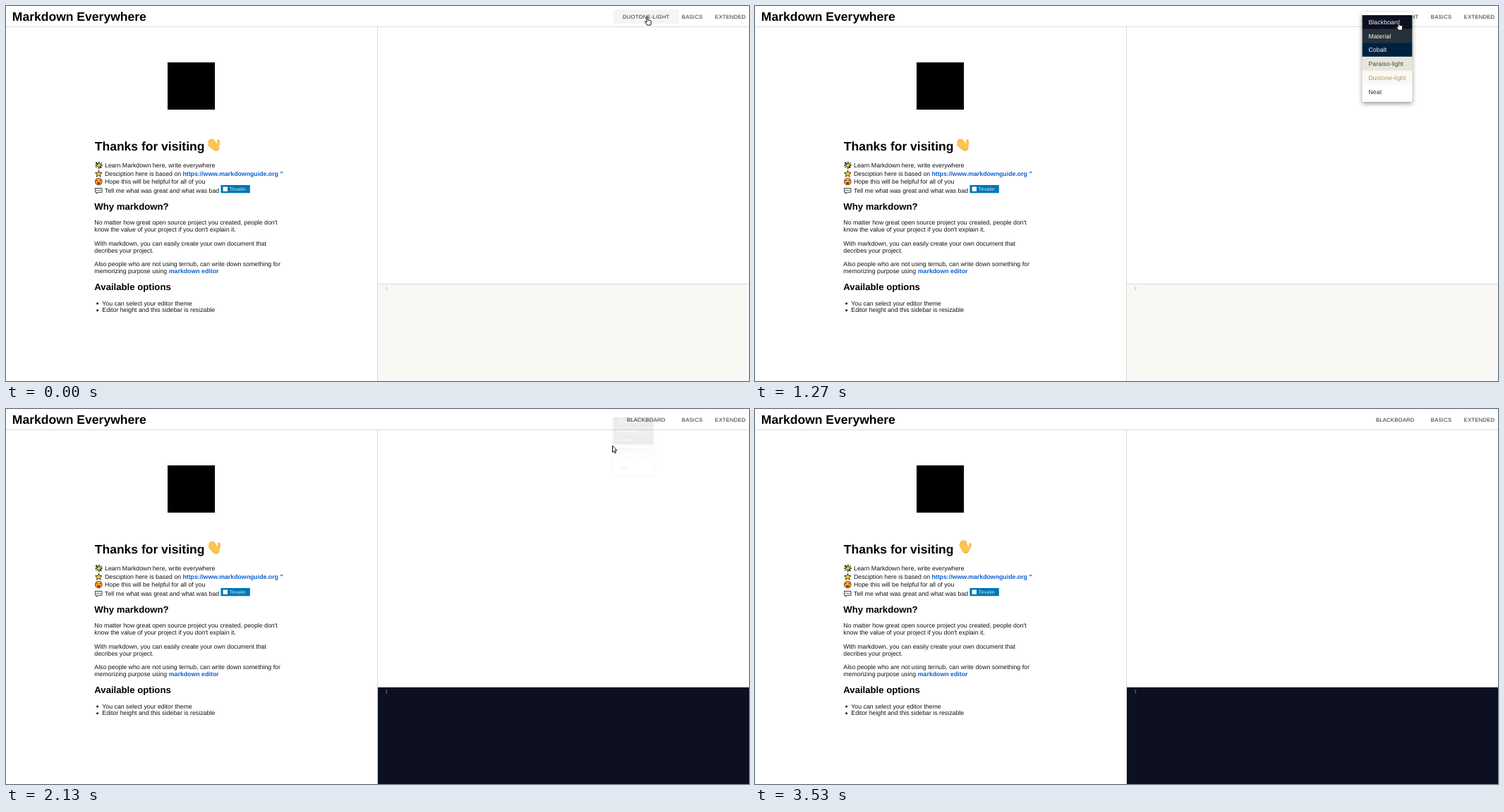
Animation of 1053x532 px, one loop 3.59 s. Source, as an HTML page with a canvas:

```html
<!DOCTYPE html>
<html lang="en">
<head>
<meta charset="utf-8">
<title>Markdown Everywhere</title>
<style>
html, body { margin: 0; width: 100%; height: 100%; overflow: hidden; background: #fff; }
canvas { display: block; }
</style>
</head>
<body>
<canvas id="stage" width="1053" height="532"></canvas>
<script>
const ctx = document.getElementById('stage').getContext('2d');
const LOOP = 3590, STEP = 1000 / 15;
const SANS = '"Liberation Sans", Arial, sans-serif';
const BODY = 8.776;
const INK = '#111', LINK = '#0a5fd0';
const MENU = { x: 860.6, y: 8.6, w: 70.8, h: 127.5, row: 19.75, pad: 4.4 };
const THEMES = [
  ['Blackboard', '#0c1021', '#f8f8f8'],
  ['Material', '#263238', '#ffffff'],
  ['Cobalt', '#002240', '#ffffff'],
  ['Paraiso-light', '#e7e6da', '#41423f'],
  ['Duotone-light', '#faf8f5', '#b29762'],
  ['Neat', '#ffffff', '#333333'],
];

// [ms, value...] keys
const WAVE = [
  [0, 0], [200, .5], [270, .5], [470, 0], [670, 0], [870, .5], [1070, .3], [1200, 0], [1270, 0],
  [1430, .5], [1600, 0], [1670, 0], [1867, 1], [1933, .75], [2200, 0], [2400, .7], [2600, .5],
  [2800, 0], [3000, 1], [3200, 0], [3330, 0], [3533, .8],
];
const POINTER = [
  [0, 908.7, 15.3], [1130, 908.7, 15.3], [1265, 912, 22.5], [2070, 912, 22.5], [2133, 860, 52],
  [2200, 759, 108], [2267, 600, 208], [2400, 335, 365], [2600, 132, 481], [2733, 71.5, 521],
  [2870, 71.5, 521], [3000, 71.5, 534],
];

const clamp = v => Math.max(0, Math.min(1, v));
const phase = (t, start, length) => clamp((t - start) / length);

function track(keys, t) {
  let i = 0;
  while (i < keys.length - 2 && t > keys[i + 1][0]) i++;
  const [a, b] = [keys[i], keys[i + 1]];
  const p = phase(t, a[0], b[0] - a[0]);
  return a.slice(1).map((v, k) => v + (b[k + 1] - v) * p);
}

// cubic-bezier(.4, 0, .2, 1)
function ease(x) {
  let lo = 0, hi = 1, u = .5;
  for (let i = 0; i < 20; i++) {
    u = (lo + hi) / 2;
    const v = 1.2 * u * (1 - u) ** 2 + .6 * u * u * (1 - u) + u ** 3;
    if (v < x) lo = u; else hi = u;
  }
  return 3 * u * u * (1 - u) + u ** 3;
}

function rect(x, y, w, h, color, c = ctx) {
  c.fillStyle = color;
  c.fillRect(x, y, w, h);
}

function disc(x, y, r, color) {
  ctx.beginPath();
  ctx.arc(x, y, r, 0, Math.PI * 2);
  ctx.fillStyle = color;
  ctx.fill();
}

function text(str, x, y, size = BODY,
  { color = INK, bold = false, space = 0, align = 'left', family = SANS, c = ctx } = {}) {
  c.font = `${bold ? 'bold ' : ''}${size}px ${family}`;
  c.textRendering = 'geometricPrecision';
  c.letterSpacing = space + 'px';
  c.textAlign = align;
  c.fillStyle = color;
  c.fillText(str, x, y);
}

function star(x, y, outer, inner, points, fill, stroke, width = 1) {
  ctx.beginPath();
  for (let i = 0; i < points * 2; i++) {
    const r = i % 2 ? inner : outer, a = i * Math.PI / points - Math.PI / 2;
    ctx.lineTo(x + r * Math.cos(a), y + r * Math.sin(a));
  }
  ctx.closePath();
  ctx.fillStyle = fill;
  ctx.fill();
  if (!stroke) return;
  ctx.lineWidth = width;
  ctx.lineJoin = 'round';
  ctx.strokeStyle = stroke;
  ctx.stroke();
}

function stroke(color, width, ...points) {
  ctx.beginPath();
  points.forEach(([x, y]) => ctx.lineTo(x, y));
  ctx.lineCap = ctx.lineJoin = 'round';
  ctx.lineWidth = width;
  ctx.strokeStyle = color;
  ctx.stroke();
}

function waveHand(raise) {
  ctx.save();
  ctx.translate(300.3, 203.8);
  ctx.rotate((-40 + 25 * raise) * Math.PI / 180);
  ctx.scale(.94, .94);
  const skin = '#fbc64f', edge = '#e8a13a';
  const fingers = [[-5.2, -14], [-2.6, -17.3], [.4, -18], [3.2, -16.3]];
  for (const [color, width] of [[edge, 3.7], [skin, 2.9]]) {
    fingers.forEach(([x, y]) => stroke(color, width, [x * .8, -6], [x, y]));
    stroke(color, width, [3, -4], [7, -6.5], [9, -10]);
  }
  ctx.beginPath();
  ctx.ellipse(-.3, -5.6, 5.6, 6.6, 0, 0, Math.PI * 2);
  ctx.fillStyle = skin;
  ctx.fill();
  stroke(edge, .7, [-4, -2], [-1, .3], [3, -.5]);
  ctx.restore();
}

function bulletIcons() {
  stroke('#222', 2.2, [128, 222.5], [134.5, 229]);
  star(131.7, 226, 5.2, 2, 4, '#f7cf3c', '#2b2b22', .9);
  star(128, 228.7, 2.4, .9, 4, '#6fbf4a');
  star(135, 223.3, 2.2, .8, 4, '#4b9b52');

  star(131.3, 238.2, 5, 2.3, 5, '#fcc93f', '#37280f', .9);

  disc(131.3, 249, 5.3, '#3b2310');
  disc(131.3, 249, 4.6, '#fbb62f');
  star(128.8, 247.6, 2.2, .9, 5, '#e2492f');
  star(133.8, 247.6, 2.2, .9, 5, '#e2492f');
  ctx.beginPath();
  ctx.arc(131.3, 250.2, 2.5, 0, Math.PI);
  ctx.fillStyle = '#6a2a16';
  ctx.fill();

  stroke('#222', .9, [126.6, 258.6], [136, 258.6], [136, 264.3], [131, 264.3],
    [128.7, 266.3], [128.7, 264.3], [126.6, 264.3], [126.6, 258.6]);
  [129, 131.3, 133.6].forEach(x => disc(x, 261.5, .75, '#222'));
}

function article() {
  const left = 125.3;
  rect(229, 80, 67, 67, '#000');
  text('Thanks for visiting', 125.8, 205.4, 17.5, { bold: true, color: '#000' });
  bulletIcons();
  text('Learn Markdown here, write everywhere', 140, 229);
  text('Desciption here is based on', 140, 240.6);
  text('https://www.markdownguide.org "', 250.4, 240.6, BODY, { bold: true, color: LINK });
  text('Hope this will be helpful for all of you', 140, 252.2);
  text('Tell me what was great and what was bad', 140, 265);

  rect(304.4, 254, 41.4, 11.3, '#0077b5');
  rect(307.6, 256.5, 6.4, 6.4, '#fff');
  text('Tirvolin', 317, 261.8, 6.2, { color: '#fff', family: '"DejaVu Sans", sans-serif' });

  const heading = (str, y) => text(str, left, y, 13.16, { bold: true, color: '#000' });
  heading('Why markdown?', 289.3);
  text('No matter how great open source project you created, people don\'t', left, 310.2);
  text('know the value of your project if you don\'t explain it.', left, 320);
  text('With markdown, you can easily create your own document that', left, 339.8);
  text('decribes your project.', left, 349.6);
  text('Also people who are not using ternub, can write down something for', left, 369.4);
  text('memorizing purpose using', left, 379.4);
  text('markdown editor', 230.8, 379.4, BODY, { bold: true, color: LINK });
  heading('Available options', 403.2);
  ['You can select your editor theme', 'Editor height and this sidebar is resizable'].forEach((str, i) => {
    disc(129.6, 421.9 + i * 9.9, 1.5, INK);
    text(str, 136.3, 424.5 + i * 9.9);
  });
}

function navLabel(str, x, align) {
  text(str, x, 17.7, 7.68, { color: '#2b2b2b', space: .22, align });
}

function toolbar(t, dark) {
  rect(0, 29, 1053, 1, '#dcdcdc');
  text('Markdown Everywhere', 8.8, 20.9, 17.55, { bold: true, color: '#000' });

  ctx.save();
  ctx.beginPath();
  ctx.roundRect(860.6, 5, 93, 20, 2.2);
  ctx.clip();
  ctx.globalAlpha = 1 - phase(t, 740, 120);
  rect(860, 5, 94, 20, '#f4f5f5');
  if (t > 735 && t < 1200) {
    ctx.globalAlpha = .24 * (1 - phase(t, 870, 330));
    disc(908.5, 20, 52 * ease(phase(t, 680, 550)), '#222');
  }
  ctx.restore();

  navLabel(dark ? 'BLACKBOARD' : 'DUOTONE-LIGHT', 907.2, 'center');
  navLabel('BASICS', 957.8);
  navLabel('EXTENDED', 1004.8);
}

function editor(dark) {
  rect(526, 30, 1, 502, '#d9d9d9');
  rect(527, 394, 526, 1, '#d9d9d9');
  rect(527, 395, 526, 137, dark ? '#0c1021' : '#f9f8f4');
  rect(538.8, 398.3, .9, 5.2, dark ? '#8b8d94' : '#bdb8b0');
}

// The menu is painted opaque on its own layer so that it fades as one group.
const layer = document.createElement('canvas');
layer.width = 1053;
layer.height = 160;
const layerCtx = layer.getContext('2d');

function menu(t) {
  if (t <= 800 || t >= 2200) return;
  const closing = t > 2000;
  const grow = closing ? 1 - ease(phase(t, 2067, 133)) : ease(phase(t, 800, 133));
  const fade = closing ? 1 - ease(phase(t, 2000, 200)) : ease(phase(t, 800, 180));
  const c = layerCtx;
  c.clearRect(0, 0, layer.width, layer.height);
  c.save();
  c.translate(MENU.x, MENU.y);
  c.scale(.75 + .25 * grow, .5625 + .4375 * grow);
  c.shadowColor = 'rgba(0,0,0,.42)';
  c.shadowBlur = 6;
  c.shadowOffsetY = 2.5;
  c.beginPath();
  c.roundRect(0, 0, MENU.w, MENU.h, 2.2);
  c.fillStyle = '#fff';
  c.fill();
  c.shadowColor = 'transparent';
  THEMES.forEach(([name, back, ink], i) => {
    const y = MENU.pad + i * MENU.row;
    rect(0, y - (i ? .4 : 0), MENU.w, MENU.row + .4, back, c);
    text(name, 8.78, y + 12.8, BODY, { color: ink, space: .08, c });
  });
  c.restore();
  ctx.globalAlpha = fade;
  ctx.drawImage(layer, 0, 0);
  ctx.globalAlpha = 1;
}

function outline(path) {
  const shape = new Path2D(path);
  ctx.lineJoin = 'round';
  ctx.lineWidth = 1;
  ctx.strokeStyle = '#111';
  ctx.fillStyle = '#fff';
  ctx.fill(shape);
  ctx.stroke(shape);
}

function pointer(t) {
  if (t >= 3000) return;
  const [x, y] = track(POINTER, t);
  ctx.save();
  ctx.translate(x, y);
  if (t < 2120) {
    outline('M-.8 .8Q.3-.4 1 .9V4.6L4.4 5.3Q6 5.8 5.7 7.5L5 11.8H.2L-2.9 7.7Q-3.2 6.3-1.9 6.5L-.8 7.4Z');
  } else {
    outline('M0 0V9L2 7.2L3.4 10.4L4.9 9.7L3.5 6.6H6Z');
  }
  ctx.restore();
}

function draw(now) {
  const frame = Math.floor((now % LOOP + 5) / STEP);
  const t = Math.min(frame, 53) * STEP;
  const dark = t > 1900;
  rect(0, 0, 1053, 532, '#fff');
  article();
  waveHand(track(WAVE, t)[0]);
  editor(dark);
  toolbar(t, dark);
  menu(t);
  pointer(t);
}

const start = performance.now();
function tick() {
  draw(performance.now() - start);
  requestAnimationFrame(tick);
}
tick();
</script>
</body>
</html>
```
